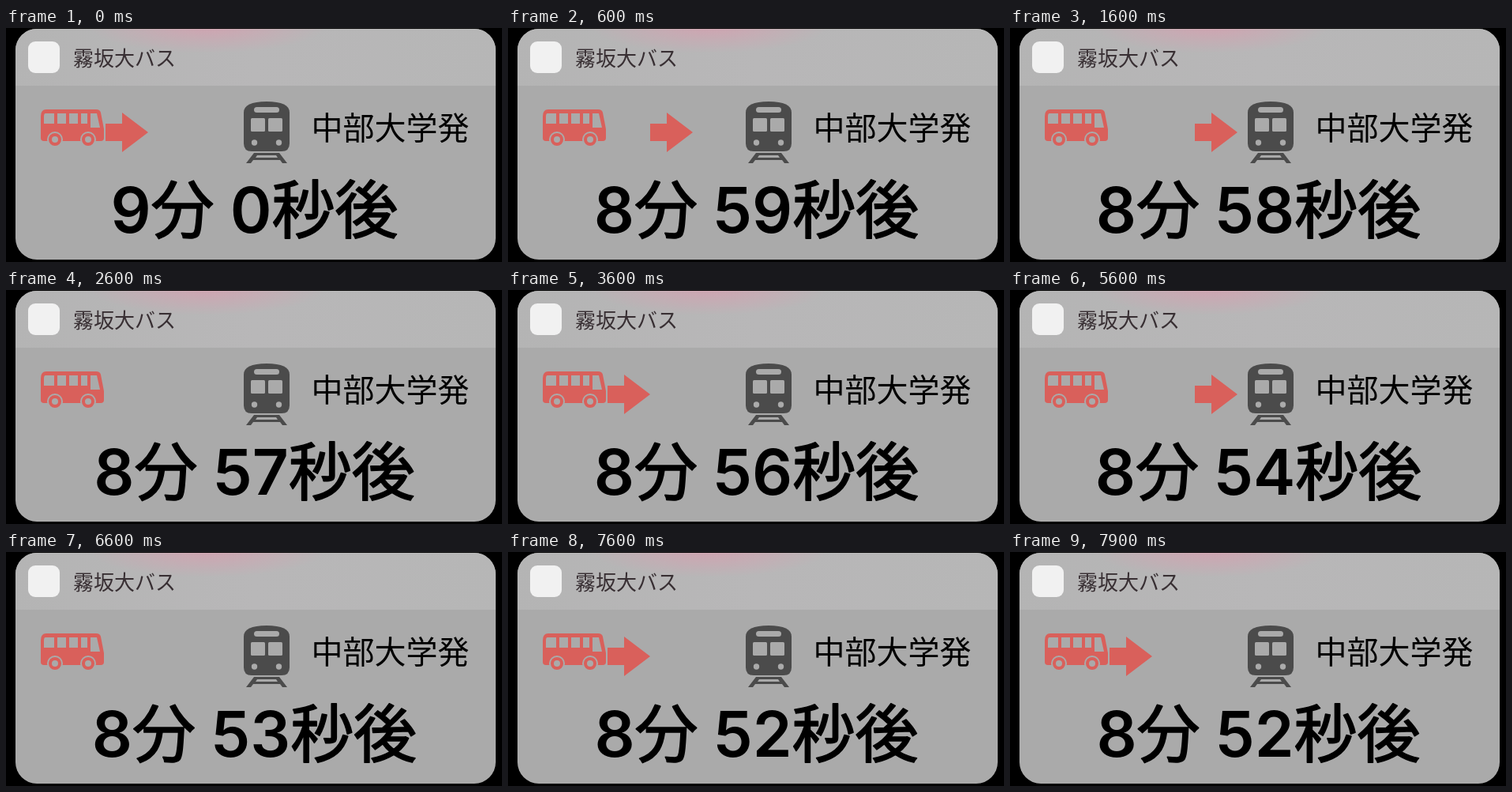
Write an HTML page that moves like this. It is 628 px wide and 296 px high and loops after 8000 ms.

```html
<!DOCTYPE html>
<html lang="ja">
<head>
<meta charset="utf-8">
<title>バス発車カウントダウン</title>
<style>
  html, body { margin: 0; width: 100%; height: 100%; overflow: hidden; background: #000; }
  svg { display: block; width: 628px; height: 296px; }
  text { font-family: Inter, "Noto Sans CJK JP", "Noto Sans CJK", sans-serif; }
  .title { font-size: 26px; fill: #382f33; }
  .label { font-size: 40px; }
  .timer { font-size: 80px; font-weight: 600; text-anchor: middle; }
  .unit { font-weight: 400; stroke: #000; stroke-width: 1.7; stroke-linejoin: round; }
  .red { fill: #d9605b; }
  .dark { fill: #4b4b4b; }
  .hole { fill: #aaa; }
</style>
</head>
<body>
<svg viewBox="0 0 628 296">
  <defs>
    <clipPath id="card"><rect x="12" y="1" width="608" height="292" rx="27"/></clipPath>
    <linearGradient id="header">
      <stop offset="0" stop-color="#b4b4b4"/>
      <stop offset=".5" stop-color="#b8b7b8"/>
      <stop offset="1" stop-color="#b6b6b6"/>
    </linearGradient>
    <radialGradient id="glow">
      <stop offset="0" stop-color="#d0a4b1"/>
      <stop offset="1" stop-color="#d0a4b1" stop-opacity="0"/>
    </radialGradient>
  </defs>

  <g clip-path="url(#card)">
    <rect width="628" height="296" fill="#aaa"/>
    <rect width="628" height="73" fill="url(#header)"/>
    <ellipse cx="255" cy="-2" rx="150" ry="34" fill="url(#glow)"/>
  </g>

  <rect x="28" y="17" width="40" height="40" rx="9" fill="#f1f1f1"/>
  <text class="title" x="85" y="48">霧坂大バス</text>

  <g id="bus">
    <path class="red" d="M51 103H114Q119 103 120 107L124 128V139Q124 143 120 143H48Q44 143 44 139V112Q44 103 51 103Z"/>
    <path class="hole" d="M50 108H61V121H48V112Q48 108 50 108ZM65 108H76V121H65ZM80 108H91V121H80ZM95 108H103V121H95ZM107 108H115L119 126H107Z"/>
    <g id="wheels"></g>
  </g>

  <path id="arrow" class="red" d="M126 121H147V107L180 132L147 157V143H126Z"/>

  <g id="train">
    <path class="dark" d="M301 107Q301 93 330 93T359 107V146Q359 156 349 156H311Q301 156 301 146Z"/>
    <rect class="hole" x="314" y="100" width="32" height="7" rx="3.5"/>
    <rect class="hole" x="310" y="114" width="18" height="17" rx="1.5"/>
    <rect class="hole" x="332" y="114" width="18" height="17" rx="1.5"/>
    <circle class="hole" cx="314.5" cy="145" r="3.7"/>
    <circle class="hole" cx="345.5" cy="145" r="3.7"/>
    <path class="dark" d="M314 158H346L356 171H350L347 167H313L310 171H304ZM318 161L316 164H344L342 161Z" fill-rule="evenodd"/>
  </g>

  <text class="label" x="386.5" y="141">中部大学発</text>
  <text class="timer" x="314.5" y="259"><tspan id="minutes"></tspan><tspan class="unit">分</tspan> <tspan id="seconds"></tspan><tspan class="unit">秒後</tspan></text>
</svg>
<script>
  const LOOP = 8000, FIRST_TICK = 600, START_SECONDS = 540, ARROW_STEP = 54;
  const byId = id => document.getElementById(id);
  const arrow = byId('arrow'), minutes = byId('minutes'), seconds = byId('seconds');

  const circle = (cls, x, r) => `<circle class="${cls}" cx="${x}" cy="141" r="${r}"/>`;
  byId('wheels').innerHTML = [62, 104].map(x =>
    circle('hole', x, 10) + circle('red', x, 8) + circle('hole', x, 4)).join('');

  let shownTick = -1;

  function draw(now) {
    const tick = Math.floor((now % LOOP + 1000 - FIRST_TICK) / 1000);
    if (tick !== shownTick) {
      shownTick = tick;
      const left = START_SECONDS - tick;
      minutes.textContent = Math.floor(left / 60);
      seconds.textContent = left % 60;

      // Three arrow positions, then one blank second.
      const step = tick % 4;
      arrow.setAttribute('transform', `translate(${step * ARROW_STEP} 0)`);
      arrow.setAttribute('visibility', step < 3 ? 'visible' : 'hidden');
    }
    requestAnimationFrame(draw);
  }
  draw(performance.now());
</script>
</body>
</html>
```
